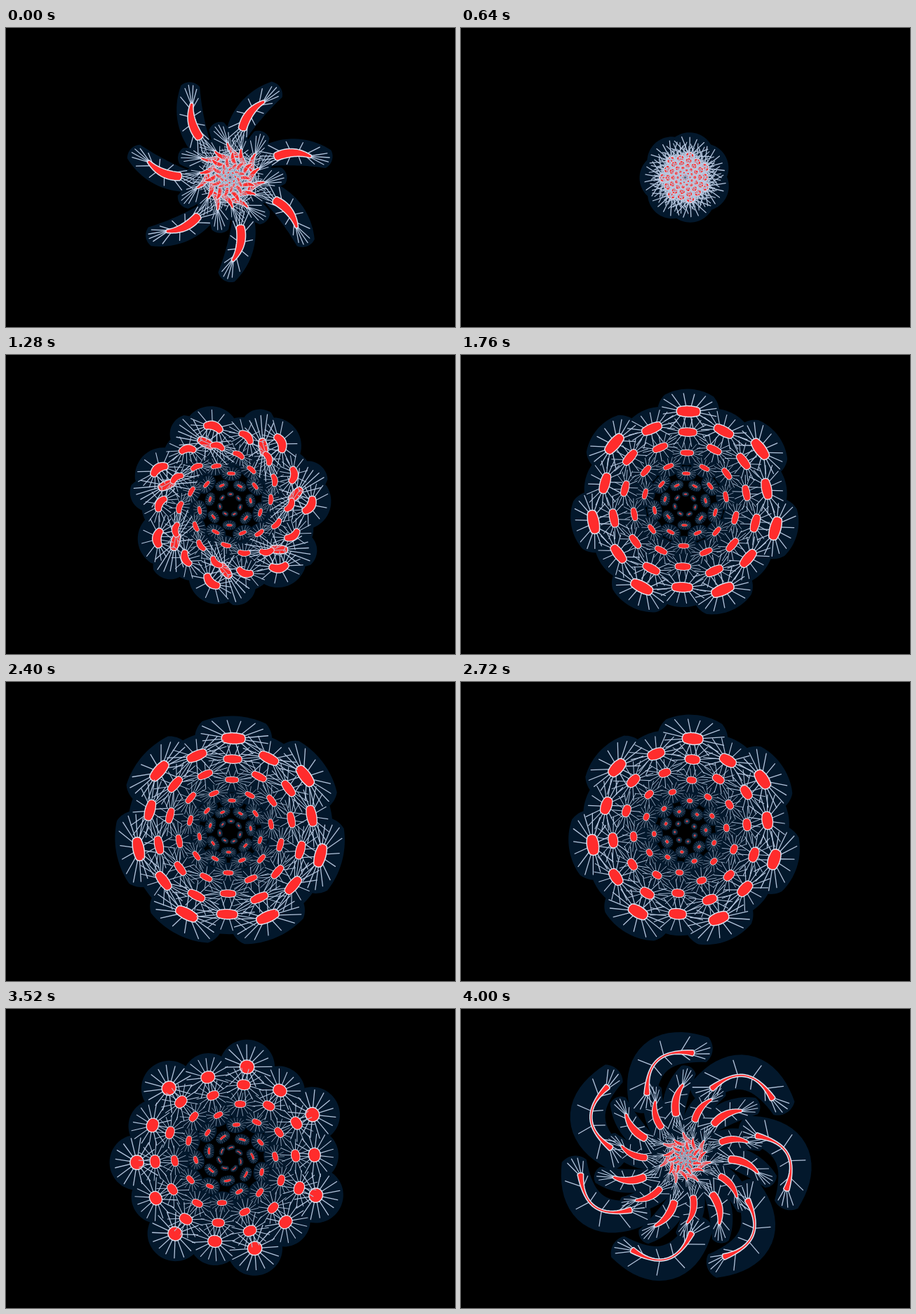
An HTML page with a canvas that plays this animation: 640 px wide and 427 px high, repeating every 4080 ms.

```html
<!DOCTYPE html>
<html>
<head>
<meta charset="utf-8">
<style>
  html, body { margin: 0; width: 100%; height: 100%; overflow: hidden; background: #000; }
  canvas { display: block; }
</style>
</head>
<body>
<canvas id="stage" width="640" height="427"></canvas>
<script>
const ctx = document.getElementById('stage').getContext('2d');
const TAU = Math.PI * 2, ARMS = 7, LAYERS = 9, STEPS = 51, STEP_MS = 80;
const ARM_ANGLE = 360 / ARMS, RAYS = 16;
const MEMBRANE = '#03182c', RAY = '#b4c4dc', RIM = '#dfe3f0', RED = '#ff2c2c';

// A cell sits at (r, angle clockwise from the top) and is drawn out along its orbit, turned by tilt.
// pad and reach give the membrane's margin around and beyond the nucleus.
const REST = { r: 133, angle: -49.4, length: 18, tilt: 0, width: 7.2, taper: 1, bend: 0, waist: 0, pad: 32, reach: 3 };
const BALL = { ...REST, angle: -41, length: 1, width: 9, pad: 39, reach: 0 };
const SEED = { ...BALL, r: 31, angle: 12, width: 5, pad: 34 };
const TEAR = { ...REST, r: 96.7, angle: -31.6, length: 43, tilt: -70, taper: 0.3, bend: 0.1, pad: 19, reach: 14 };

// Key poses; each is held for a while, then eased into the next.
const keys = [
  { at: 0, hold: 0, ...TEAR },
  { at: 1, hold: 1, ...TEAR, r: 45, angle: -22, length: 23, tilt: -130, width: 5, reach: 20 },
  { at: 8, hold: 17, ...SEED },
  { at: 32, hold: 0, ...REST, r: 94.5, angle: -21.5, length: 13, tilt: 50, width: 5.5, pad: 28, reach: 20 },
  { at: 33, hold: 2, ...REST, r: 127, angle: -38, tilt: 30, width: 6.3, bend: 0.15, pad: 30 },
  { at: 38, hold: 14, ...REST },
  { at: 60, hold: 4, ...REST, reach: 14 },
  { at: 77, hold: 11, ...BALL },
  { at: 94, hold: 0, ...BALL, r: 147, length: 15, tilt: -15, width: 8, pad: 36 },
  { at: 100, hold: 0, ...REST, r: 125.5, angle: -62.2, length: 83, tilt: -31, width: 5, bend: 0.28, waist: 0.84, pad: 25, reach: 9 },
  { at: 101, hold: 1, ...TEAR, angle: TEAR.angle - ARM_ANGLE }
];

const mix = (a, b, f) => a + (b - a) * f;

function poseAt(u) {
  u %= 2 * STEPS;
  const index = keys.findLastIndex(key => key.at <= u);
  const from = keys[index], to = keys[index + 1], end = from.at + from.hold;
  if (u <= end) return from;
  const f = (u - end) / (to.at - end), pose = {};
  for (const name in REST) pose[name] = mix(from[name], to[name], f);
  return pose;
}

// Outline of a bent, variable-width stroke around the origin, heading along +x.
// v runs 0..4: side, head, side, tail; the normal turns a quarter on each part.
function outline(length, bulge, width) {
  return v => {
    const part = Math.floor(v) % 4, f = v % 1;
    const s = [f, 1, 1 - f, 0][part];
    const slope = Math.atan2(4 * bulge * (1 - 2 * s), length);
    const normal = slope + Math.PI * (0.75 - v / 2);
    const w = width(s);
    return [
      (s - 0.5) * length + w * Math.cos(normal),
      4 * bulge * s * (1 - s) + w * Math.sin(normal)
    ];
  };
}

function tracePath(edge) {
  const path = new Path2D();
  for (let i = 0; i < 80; i++) path.lineTo(...edge(i / 20));
  path.closePath();
  return path;
}

function buildCell(u) {
  const { r, angle, length, tilt, width, taper, bend, waist, pad, reach } = poseAt(u);
  const bulge = bend * length;
  const nucleus = outline(length, bulge, s =>
    width * mix(taper, 1, s) * (1 - waist * (1 - (2 * s - 1) ** 4)));
  const skin = outline(length + 2 * reach, bulge * 1.2, () => pad);
  const rays = new Path2D();
  for (let i = 0; i < RAYS; i++) {
    const v = (i + 0.5) * 4 / RAYS, f = 0.8 + 0.08 * Math.sin(i * 5);
    const p = nucleus(v), q = skin(v);
    rays.moveTo(...p);
    rays.lineTo(mix(p[0], q[0], f), mix(p[1], q[1], f));
  }
  return { r, angle, tilt, rays, skin: tracePath(skin), nucleus: tracePath(nucleus) };
}

function drawMembrane({ skin }) {
  ctx.fillStyle = MEMBRANE;
  ctx.fill(skin);
}

function drawNucleus({ rays, nucleus }) {
  ctx.strokeStyle = RAY;
  ctx.lineWidth = 1.3;
  ctx.stroke(rays);
  ctx.strokeStyle = RIM;
  ctx.lineWidth = 3;
  ctx.stroke(nucleus);
  ctx.fillStyle = RED;
  ctx.fill(nucleus);
}

function drawRing(cell, depth, paint) {
  const scale = 1 - depth / LAYERS;
  for (let arm = 0; arm < ARMS; arm++) {
    ctx.save();
    ctx.translate(319.5, 213.5);
    ctx.scale(scale, scale);
    ctx.rotate((arm + depth / 2) * TAU / ARMS + cell.angle * TAU / 360);
    ctx.translate(0, -cell.r);
    ctx.rotate(Math.PI + cell.tilt * TAU / 360);
    paint(cell);
    ctx.restore();
  }
}

function draw(now) {
  const step = Math.floor(now / STEP_MS) % STEPS;
  ctx.fillStyle = '#000';
  ctx.fillRect(0, 0, 640, 427);
  ctx.lineCap = ctx.lineJoin = 'round';

  // Inner rings are smaller and run ahead by half a step each.
  const rings = Array.from({ length: LAYERS }, (_, depth) => buildCell(2 * step + depth));
  rings.forEach((cell, depth) => drawRing(cell, depth, drawMembrane));
  rings.forEach((cell, depth) => drawRing(cell, depth, drawNucleus));
  requestAnimationFrame(() => draw(performance.now() - start));
}

const start = performance.now();
draw(0);
</script>
</body>
</html>
```
